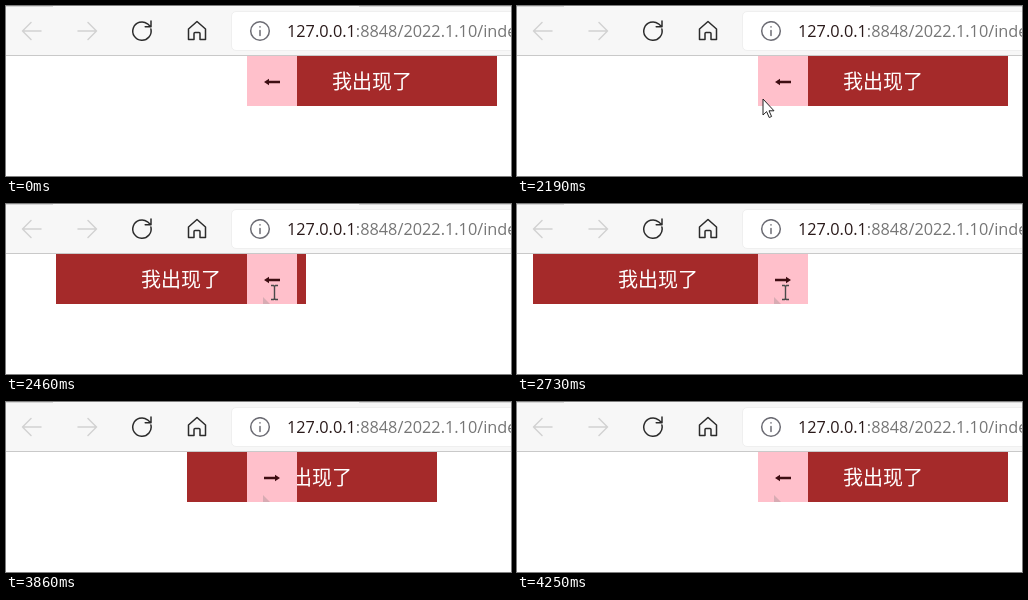
Animation of 505x170 px, one loop 5320 ms. Source, as an HTML page:

```html
<!DOCTYPE html>
<html lang="zh-CN">
<head>
<meta charset="utf-8">
<title>Sliding panel</title>
<style>
  html, body { margin: 0; width: 100%; height: 100%; overflow: hidden; background: #fff; }
  svg { display: block; }
  .icon { fill: none; stroke: #2b2b2b; stroke-width: 1.5; stroke-linejoin: round; stroke-linecap: round; }
  .off { stroke: #d2d2d2; }
  .url { font: 16.3px "Open Sans", "Noto Sans", sans-serif; fill: #767676; }
  .label { font: 20px "Noto Sans CJK SC", "Noto Sans CJK", sans-serif; fill: #fff; }
</style>
</head>
<body>
<svg width="505" height="170" viewBox="0 0 505 170">
  <rect width="505" height="49" fill="#f7f7f7"/>
  <path d="M0 .5H47M353 .5H505" stroke="#d6d6d6"/>
  <rect y="49" width="505" height="1" fill="#c9c9c9"/>

  <rect x="225.5" y="5.5" width="300" height="39" rx="4.5" fill="#fff" stroke="#efefef"/>
  <path class="icon off" d="M35 25H16.5M25 16.5L16.5 25L25 33.5"/>
  <path class="icon off" d="M72 25H90.5M82 16.5L90.5 25L82 33.5"/>
  <path class="icon" d="M144.9 23A9.2 9.2 0 1 1 141.5 17.8L144.5 20.5M145 15V20.8H139.2"/>
  <path class="icon" d="M182.5 23L191 15.5L199.5 23V33.5H194V27.5Q194 26.5 193 26.5H189Q188 26.5 188 27.5V33.5H182.5Z"/>
  <g class="icon" style="stroke: #6c6c74">
    <circle cx="254" cy="25" r="9.3"/>
    <path d="M254 24.5V29.5M254 20.8V21"/>
  </g>
  <text class="url" x="281" y="31"><tspan fill="#2a1a1a">127.0.0.1</tspan>:8848/2022.1.10/index.html</text>

  <g id="panel">
    <rect y="50" width="250" height="50" fill="#a52a2a"/>
    <text class="label" x="85" y="83">我出现了</text>
  </g>
  <rect x="241" y="50" width="50" height="50" fill="#ffc0cb"/>
  <path id="sign" d="M-8 0L-3 -3.3V-1.3H8V1.3H-3V3.3Z" fill="#3d0d12"/>
  <path id="trail" d="M257 93V100H264Z" fill="#d8abb3"/>

  <path id="pointer" d="M0 0V16L3.6 12.6L6.2 18.5L8.6 17.5L6 11.8H11Z" fill="#fff" stroke="#222"/>
  <g id="beam" fill="none">
    <path d="M265 81.5H267.5L268.5 82.5L269.5 81.5H272M268.5 82.5V94.5M265 95.5H267.5L268.5 94.5L269.5 95.5H272" stroke="#4a4a4a" stroke-width="1.4"/>
  </g>
</svg>
<script>
const LOOP = 5320;
const OPEN = 2060, CLOSE = 3660;
const RIGHT = 241, LEFT = 16;
const [panel, sign, trail, pointer, beam] =
  ["panel", "sign", "trail", "pointer", "beam"].map(id => document.getElementById(id));

const show = (el, on) => el.setAttribute("visibility", on ? "visible" : "hidden");
const move = (el, x, y, flip = 1) =>
  el.setAttribute("transform", `translate(${x} ${y}) scale(${flip} 1)`);

// Each step covers a tenth of the remaining way, rounded up.
function ease(from, to, steps) {
  let gap = Math.abs(to - from);
  for (let i = 0; i < steps; i++) gap -= Math.ceil(gap / 10);
  return to + Math.sign(from - to) * gap;
}

// The screen refreshes in coarse ticks, several steps apart.
const stepsAt = (tick, pivot) => Math.round(12 + 4.8 * (tick - pivot));

function pointerAt(t, tick) {
  if (t >= OPEN && tick < 3) return [[236, 18], [246, 93], [257, 93]][tick];
  if (t >= CLOSE && t < CLOSE + 70) return [267.5, 106.5];
  return null;
}

function draw(t) {
  const closing = t >= CLOSE;
  const tick = closing ? Math.floor((t - CLOSE) / 65.5) : Math.floor((t - OPEN) / 67);
  const x = closing
    ? ease(LEFT, RIGHT, stepsAt(tick, 3))
    : ease(RIGHT, LEFT, stepsAt(tick, 4));
  const opened = closing ? tick < 9 : tick >= 10;

  move(panel, x, 0);
  move(sign, 266, 76, opened ? -1 : 1);

  const tip = pointerAt(t, closing ? Infinity : tick);
  show(pointer, tip);
  if (tip) move(pointer, ...tip);
  show(beam, !closing && tick >= 3);
  show(trail, closing || tick >= 3);
}

function frame() {
  draw(performance.now() % LOOP);
  requestAnimationFrame(frame);
}
frame();
</script>
</body>
</html>
```
